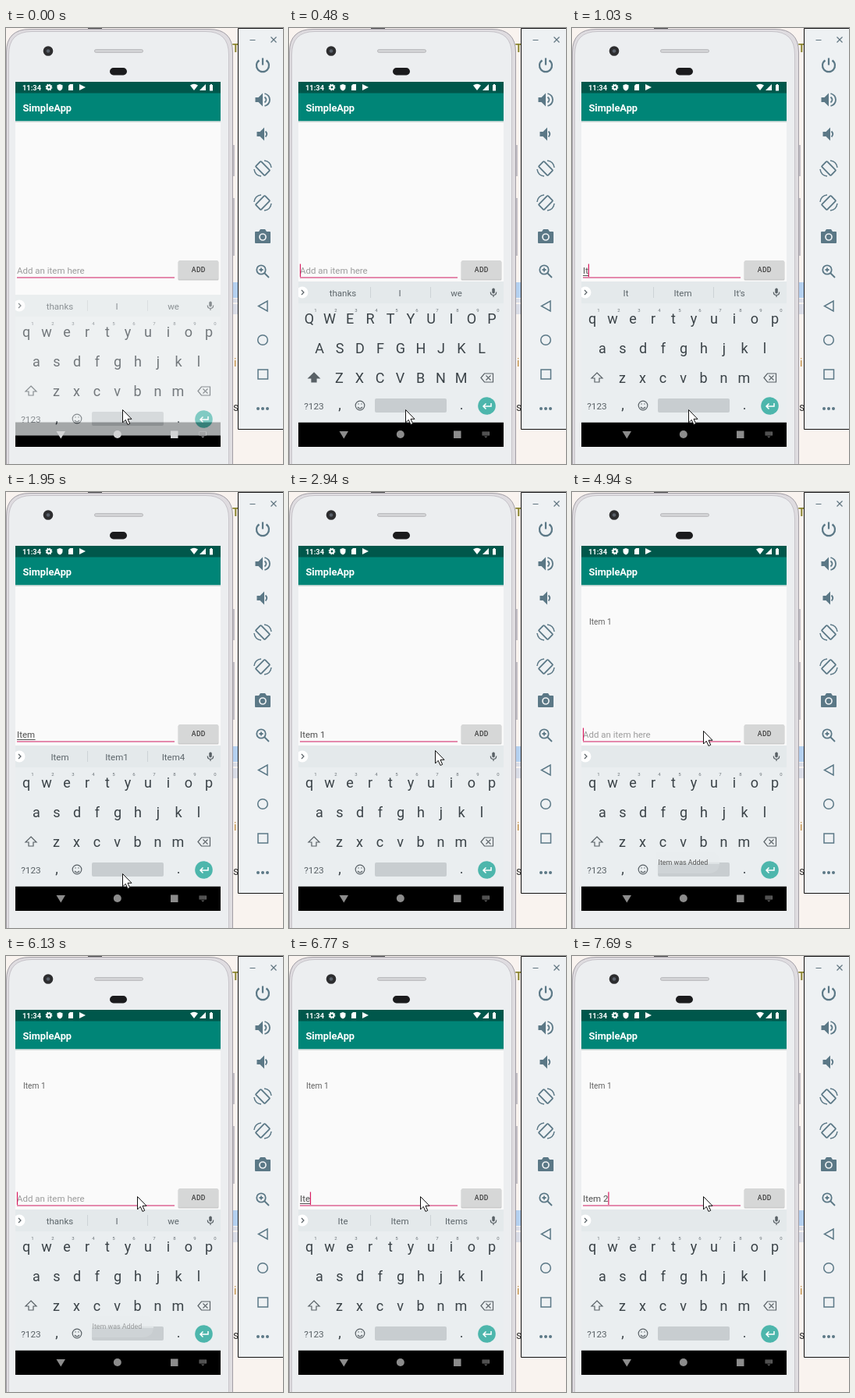
An HTML page that plays this animation: 355 px wide and 559 px high, repeating every 8000 ms.

```html
<!DOCTYPE html>
<html lang="en">
<head>
<meta charset="utf-8">
<title>Adding list items</title>
<style>
html, body { margin: 0; width: 100%; height: 100%; overflow: hidden; background: #f9f3ef; }
svg { display: block; width: 355px; height: 559px; }
text { font-family: Roboto, "Open Sans", sans-serif; white-space: pre; }
.mid { text-anchor: middle; }
.line { fill: none; stroke: #5b7886; stroke-width: 1.8; }
.key { font-size: 18px; fill: #3a4247; }
.digit { font-size: 6px; fill: #6b7378; }
.word { font-size: 11.5px; fill: #5c656a; }
.icon { fill: none; stroke: #596166; stroke-width: 1.2; }
</style>
</head>
<body>
<svg viewBox="0 0 355 559">
  <defs>
    <clipPath id="screen"><rect x="12" y="69" width="263" height="468"/></clipPath>
    <g id="rotate">
      <rect x="-4.800" y="-8.300" width="9.600" height="16.600" rx="1" transform="rotate(-45)"/>
      <path d="M2-10q8 1 9 9M-2 10q-8-1-9-9" stroke-width="1.500"/>
    </g>
  </defs>

  <!-- window behind the phone -->
  <g font-size="14">
    <text x="290" y="31" font-weight="700" fill="#8a8430">T</text>
    <path d="M290 326h7v20h-7z" fill="#b4d0f0"/>
    <path d="M290 347h7v5h-7zM290 354h7v13h-7z" fill="#d9dce6"/>
    <text x="292" y="434" fill="#c08a3c">i</text>
    <text x="291" y="491" fill="#333">s</text>
    <path d="M105 0h18v1.500h-18z" fill="#555"/>
  </g>

  <!-- phone body -->
  <path d="M290 150h3v40h-3zM290 218h3v74h-3z" fill="#c3bfc5"/>
  <path d="M.5 560V31Q.5 1.500 31 1.500H260Q290.500 1.500 290.500 31V560" fill="#dfdce0" stroke="#a29ea5"/>
  <path d="M3.500 560V34Q3.500 4.500 33 4.500H256Q285.500 4.500 285.500 34V560" fill="#eceef0" stroke="#c6c3c9"/>
  <circle cx="54" cy="29.500" r="6.300" fill="#2d2d2f"/>
  <circle cx="54" cy="29.500" r="2.300" fill="#59606a"/>
  <rect x="113.500" y="27.700" width="62" height="3.600" rx="1.800" fill="#d5d6d8" stroke="#b4b4b7"/>
  <rect x="133" y="51" width="22" height="9.500" rx="4.700" fill="#1b1b1d"/>

  <g clip-path="url(#screen)">
    <path d="M12 69h263v468H12z" fill="#fafafa"/>
    <path d="M12 83h263v36.500H12z" fill="#008577"/>
    <path d="M12 119.500h263v1.500H12z" fill="#d5dcdb"/>
    <path d="M12 69h263v14.500H12z" fill="#00574b"/>
    <g fill="#fff">
      <text x="21" y="79.500" font-size="9.300" font-weight="700">11:34</text>
      <circle cx="55" cy="76" r="2.500" fill="none" stroke="#fff" stroke-width="2"/>
      <circle cx="55" cy="76" r="3.800" fill="none" stroke="#fff" stroke-width="1.200" stroke-dasharray="1.500 1.480"/>
      <path d="M69 72l3.500 1.300v2.700q0 3-3.500 4.500q-3.500-1.500-3.500-4.500v-2.700z"/>
      <path d="M82 72h4v8h-6v-6z"/>
      <path d="M94 72l8 4l-8 4z"/>
      <path d="M236 73.500q5-3.500 10 0l-5 6.500z"/>
      <path d="M256 72v8h-8z"/>
      <path d="M261 73h1v-1h2v1h1v7.500h-4z"/>
      <text x="21.500" y="106.500" font-size="12.800" font-weight="700">SimpleApp</text>
    </g>

    <text id="item" x="22" y="170" font-size="10.200" fill="#626262">Item 1</text>

    <path d="M14 320H216" stroke="#dc6593" stroke-width="1.300"/>
    <text id="field" x="14" y="315" font-size="11.500"></text>
    <path id="compose" stroke="#555"/>
    <path id="caret" stroke="#d81b60" stroke-width="1.200"/>
    <rect x="220.500" y="299" width="52" height="24.500" rx="1.500" fill="#c9caca"/>
    <rect id="button" x="221" y="298" width="51" height="24" rx="1.500"/>
    <text class="mid" x="246.800" y="313.300" font-size="8.600" font-weight="500" letter-spacing=".3" fill="#3c3c3c">ADD</text>

    <path d="M12 505.500h263V537H12z" fill="#000"/>
    <g id="board">
      <path d="M12 325h263v180.500H12z" fill="#eaeef0"/>
      <path d="M12 325h263v28H12z" fill="#e4e9eb"/>
      <circle cx="17" cy="339" r="7.500" fill="#fff"/>
      <path class="icon" d="M16 336l3 3l-3 3"/>
      <g id="words">
        <path d="M104.500 332v14M181.500 332v14" stroke="#cdd3d6"/>
        <text class="word mid" x="69" y="343.500"></text>
        <text class="word mid" x="142" y="343.500"></text>
        <text class="word mid" x="214.500" y="343.500"></text>
      </g>
      <rect x="260.300" y="333.500" width="3.500" height="7" rx="1.700" fill="#596166"/>
      <path class="icon" d="M258.300 338.500q0 4 3.700 4t3.700-4M262 342.500v2.500"/>
      <g id="keys"></g>
      <path id="shift" d="M32 442l7 7h-4v5h-6v-5h-4z" stroke="#596166" stroke-width="1.200"/>
      <path class="icon" d="M246 448.500l4.500-5.500h11v11h-11zM252.500 445.500l6 6m0-6l-6 6"/>
      <text class="mid" x="32" y="488.500" font-size="11.800" fill="#596166">?123</text>
      <circle class="icon" cx="91" cy="484" r="5.800"/>
      <path class="icon" d="M88 486q3 3.500 6 0M88.300 482h1.500M92.200 482h1.500"/>
      <rect x="110" y="475" width="92" height="18" rx="2" fill="#c8cdd0"/>
      <circle cx="253.500" cy="484.500" r="11.300" fill="#4db6ac"/>
      <path d="M259 481v4h-10m3.500-3.500l-3.500 3.500l3.500 3.500" fill="none" stroke="#fff" stroke-width="1.500"/>
    </g>

    <g id="toast">
      <path d="M108 461h66q15 0 15 14q0 14-15 14h-66z" fill="#e3e7e9" opacity=".22"/>
      <path d="M110 474h79v3h-79z" fill="#e6eaec" opacity=".7"/>
      <text id="note" x="110.500" y="478.300" font-size="8.900" fill="#555">Item was Added</text>
    </g>

    <g id="nav">
      <path d="M64.500 517h11.500l-5.700 9.500z"/>
      <circle cx="142.800" cy="521" r="5"/>
      <path d="M211 516.500h9.500v9.500H211z"/>
      <path d="M247.500 517.500h9.500v5h-9.500zM250 523.500h4.500l-2.200 2z" opacity=".7"/>
      <path d="M248.500 519h8M248.500 521h8" stroke="#000" stroke-width=".7" stroke-dasharray="1 1"/>
    </g>
  </g>

  <!-- emulator tool panel -->
  <path d="M297.500 .5V514.500H356V.5z" fill="#eef1f3" stroke="#111"/>
  <path d="M312.500 15.500h7M339.500 11.500l7 7m0-7l-7 7" stroke="#607580" stroke-width="1.200"/>
  <g class="line">
    <path d="M324.500 41.500a8 8 0 1 0 9 0M329 38.500v9" stroke-width="2.200"/>
    <path d="M331.500 88.500q4 3.500 0 7M331.500 84q6.500 2 6.500 8t-6.500 8M332.500 132.500q3.500 3.500 0 7"/>
    <use href="#rotate" transform="translate(329 180)"/>
    <use href="#rotate" transform="translate(329 224) scale(-1 1)"/>
    <circle cx="327" cy="310" r="5.700"/>
    <path d="M331 314l6 6M324.500 310h5M327 307.500v5"/>
    <path d="M335 350v13l-11.500-6.500z" stroke-width="1.500"/>
    <circle cx="329" cy="400" r="6.300" stroke-width="1.500"/>
    <path d="M323 438h12.500v12H323z" stroke-width="1.500"/>
  </g>
  <g fill="#5b7886">
    <path d="M319.500 89h4l5.500-5.500v17l-5.500-5.500h-4zM321.500 133h4l5.500-5.500v17l-5.500-5.500h-4z"/>
    <path d="M320 261h4l2-3h6l2 3h4q1 0 1 1v13q0 1-1 1h-18q-1 0-1-1v-13q0-1 1-1z"/>
    <circle cx="329" cy="268" r="4" stroke="#eef1f3" stroke-width="1.700"/>
    <circle cx="323" cy="488" r="2"/><circle cx="329" cy="488" r="2"/><circle cx="335" cy="488" r="2"/>
  </g>

  <path id="mouse" d="M.5.5V17L4.200 13.300L7 19.500L9.700 18.300L7 12.300H12z" fill="#fff" stroke="#111"/>
</svg>
<script>
const LOOP = 8000;
const $ = id => document.getElementById(id);
const set = (id, attrs) => {
  for (const name in attrs) $(id).setAttribute(name, attrs[name]);
};

// Letter keys: characters, first centre, baseline
const rows = [["qwertyuiop", 26, 378.5], ["asdfghjkl", 39, 416.5], ["zxcvbnm", 64.5, 454.5]];
const letters = [];
function addKey(char, x, y, type = "key") {
  const el = document.createElementNS("http://www.w3.org/2000/svg", "text");
  el.setAttribute("class", type + " mid");
  el.setAttribute("x", x);
  el.setAttribute("y", y);
  el.textContent = char;
  $("keys").append(el);
  return el;
}
for (const [chars, x, y] of rows)
  [...chars].forEach((c, i) => letters.push(addKey(c, x + 26 * i, y)));
[..."1234567890"].forEach((c, i) => addKey(c, 34 + 26 * i, 364, "digit"));
addKey(",", 65, 489);
addKey(".", 221, 489);

// Each step changes part of the state and keeps the rest
const steps = [
  [0, { rising: true, caps: false, text: "", words: ["thanks", "I", "we"], caret: false,
        composing: false, mouse: [149, 489], button: "#d6d7d7", item: false, toast: 0 }],
  [120, { rising: false }],
  [360, { caps: true, caret: true }],
  [600, { text: "I", composing: true, words: ["I'm", "I", "In"] }],
  [720, { caps: false }],
  [1030, { text: "It", words: ["It", "Item", "It's"] }],
  [1280, { text: "Ite", words: ["Ite", "Item", "Items"] }],
  [1400, { text: "Item", words: ["Item", "Item1", "Item4"] }],
  [1950, { caret: false }],
  [2070, { text: "Item ", composing: false, caret: true, words: ["2", "4", "1"] }],
  [2440, { text: "Item 1", words: null }],
  [2940, { caret: false, mouse: [187, 331] }],
  [3060, { mouse: [198, 271] }],
  [3220, { mouse: [232, 297] }],
  [3370, { caret: true, mouse: [241, 305] }],
  [3520, { mouse: [243, 306] }],
  [3790, { caret: false, button: "#c9caca" }],
  [3910, { text: "", caret: true }],
  [4070, { item: true, toast: .5, button: "#d0d1d1" }],
  [4210, { caret: false, toast: .7, mouse: [242, 307], button: "#d6d7d7" }],
  [4360, { toast: .85, mouse: [208, 321] }],
  [4480, { toast: 1, mouse: [170, 323] }],
  [4630, { mouse: [166, 316] }],
  [4790, { caret: true, mouse: [167, 309] }],
  [4940, { mouse: [168, 306] }],
  [5060, { mouse: [168, 308] }],
  [5210, { caret: false }],
  [5730, { caret: true }],
  [6010, { toast: .75, words: ["thanks", "I", "we"] }],
  [6130, { toast: .5 }],
  [6250, { toast: 0, caret: false }],
  [6650, { text: "It", composing: true, caret: true, words: ["It", "Item", "It's"] }],
  [6770, { text: "Ite", words: ["Ite", "Item", "Items"] }],
  [6890, { text: "Item", words: ["Item", "Item1", "Item4"] }],
  [7170, { text: "Item ", composing: false, words: ["1", "4", "2"] }],
  [7570, { text: "Item 2", words: null }]
];

function draw(s) {
  set("board", { transform: `translate(0 ${s.rising ? 17 : 0})`, opacity: s.rising ? .7 : 1 });
  set("nav", { fill: s.rising ? "#d2d3d4" : "#8c8c8c" });
  for (const key of letters)
    key.textContent = s.caps ? key.textContent.toUpperCase() : key.textContent.toLowerCase();
  set("shift", { fill: s.caps ? "#596166" : "none" });

  set("words", { visibility: s.words ? "visible" : "hidden" });
  if (s.words)
    $("words").querySelectorAll("text").forEach((el, i) => el.textContent = s.words[i]);

  const field = $("field");
  field.textContent = s.text || "Add an item here";
  set("field", { fill: s.text ? "#505050" : "#9c9c9c" });
  const end = 14.5 + (s.text ? field.getComputedTextLength() : 0);
  set("compose", { d: s.composing ? `M14 317.500H${end}` : "" });
  set("caret", { d: s.caret ? `M${end} 302.500V319` : "" });

  set("button", { fill: s.button });
  set("item", { visibility: s.item ? "visible" : "hidden" });
  set("toast", { visibility: s.toast ? "visible" : "hidden" });
  set("note", { opacity: s.toast });
  set("mouse", { transform: `translate(${s.mouse})` });
}

function tick() {
  const time = performance.now() % LOOP;
  const state = {};
  for (const [start, change] of steps)
    if (start <= time) Object.assign(state, change);
  draw(state);
  requestAnimationFrame(tick);
}
tick();
</script>
</body>
</html>
```
